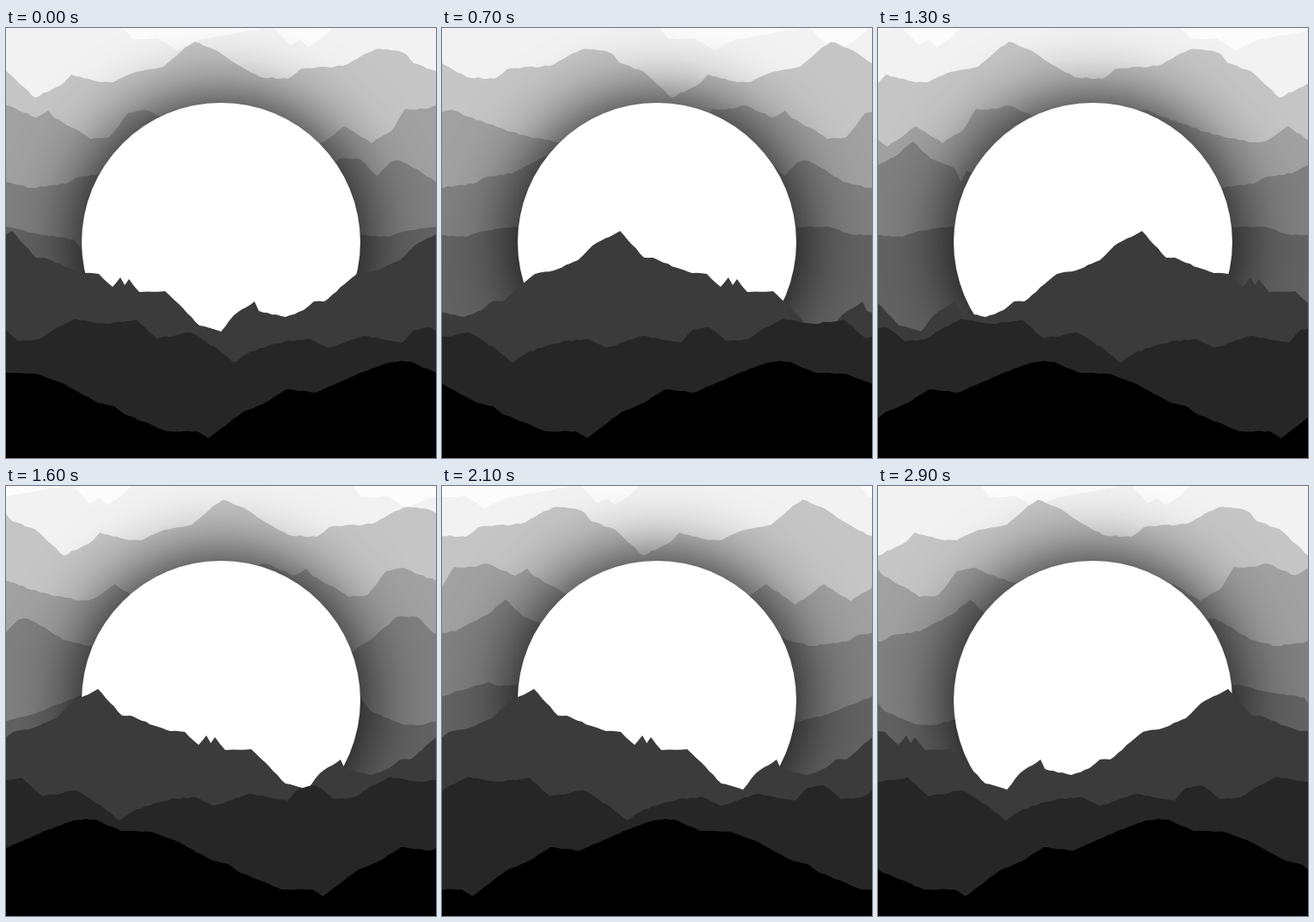
Animation of 500 by 500 pixels, one loop 3 s. Source, as an HTML page with a canvas:

```html
<!DOCTYPE html>
<html lang="en">
<head>
<meta charset="utf-8">
<title>Mountains</title>
<style>
  html, body { margin: 0; width: 100%; height: 100%; overflow: hidden; background: #fff; }
  canvas { display: block; }
</style>
</head>
<body>
<canvas id="stage" width="500" height="500"></canvas>
<script>
const SIZE = 500, LOOP = 3000, STEP = 100, LEAD = 16, GRAIN = 5;
const ctx = document.getElementById('stage').getContext('2d');

function seeded(seed) {
  return () => {
    seed = (seed * 16807) % 2147483647;
    return seed / 2147483647;
  };
}

// Joins a few key points and breaks long slopes into small seeded crags.
function outline(keys, rough, seed) {
  const random = seeded(seed * 7919);
  const closed = [...keys, [SIZE, keys[0][1]]];
  return closed.slice(0, -1).flatMap(([x, y], i) => {
    const [nextX, nextY] = closed[i + 1];
    const parts = Math.max(1, Math.round((nextX - x) / GRAIN));
    return Array.from({ length: parts }, (_, k) => {
      const crag = k ? (random() - 0.5) * rough : 0;
      return [x + (nextX - x) * k / parts, y + (nextY - y) * k / parts + crag];
    });
  });
}

// A ridge repeats every SIZE pixels and scrolls right `turns` times per loop.
const ridge = (color, turns, rough, keys) =>
  ({ color, turns, points: outline(keys, rough, turns) });

const behind = [
  ridge('#f2f2f2', 1, 1.5, [
    [0, -9], [134, -2], [147, 13], [177, 12], [200, 26], [227, 13], [299, 0], [312, 0],
    [330, 20], [342, 14], [352, 22], [367, 12], [382, -2]
  ]),
  ridge('#c5c5c5', 2, 2, [
    [0, 50], [16, 65], [34, 81], [67, 64], [76, 54], [106, 62], [125, 63], [151, 51],
    [183, 45], [208, 23], [219, 16], [240, 24], [265, 40], [295, 57], [328, 59], [342, 48],
    [392, 44], [429, 25], [452, 26], [466, 31], [474, 41]
  ]),
  ridge('#a1a1a1', 3, 2, [
    [0, 90], [10, 93], [35, 104], [49, 96], [57, 105], [80, 117], [98, 129], [120, 127],
    [142, 99], [162, 95], [180, 103], [240, 124], [285, 133], [302, 131], [327, 114], [361, 138],
    [394, 114], [425, 134], [449, 119], [464, 94], [487, 94]
  ]),
  ridge('#808080', 4, 2, [
    [0, 179], [30, 186], [70, 181], [85, 173], [115, 169], [152, 150], [174, 132], [195, 152],
    [222, 163], [230, 179], [236, 166], [242, 168], [257, 191], [268, 187], [287, 199], [298, 189],
    [326, 199], [363, 174], [388, 152], [411, 152], [432, 172], [447, 156], [458, 154], [483, 168]
  ]),
  ridge('#636363', 5, 1.5, [
    [0, 231], [35, 239], [79, 246], [91, 262], [127, 277], [147, 278], [200, 265], [265, 239],
    [305, 228], [312, 232], [365, 231], [393, 240], [445, 243], [465, 236]
  ])
];

const front = [
  ridge('#3b3b3b', 6, 1.5, [
    [0, 240], [7, 236], [35, 267], [45, 267], [58, 273], [91, 285], [108, 286], [124, 301],
    [133, 290], [138, 299], [143, 292], [155, 307], [185, 306], [201, 321], [225, 346], [250, 353],
    [265, 334], [289, 318], [294, 329], [325, 336], [346, 328], [358, 318], [370, 318], [398, 294],
    [408, 286], [430, 282], [458, 270], [475, 253]
  ]),
  ridge('#262626', 7, 2, [
    [0, 352], [14, 364], [38, 362], [60, 348], [80, 338], [116, 344], [151, 339], [176, 361],
    [214, 354], [247, 374], [265, 389], [285, 376], [325, 364], [354, 362], [374, 372], [416, 358],
    [461, 366], [475, 351], [493, 348]
  ]),
  ridge('#000', 8, 1, [
    [0, 401], [35, 402], [63, 412], [78, 420], [108, 436], [126, 440], [136, 448], [187, 469],
    [222, 469], [235, 477], [275, 447], [301, 436], [326, 420], [360, 424], [415, 400], [445, 389],
    [459, 387], [471, 388]
  ])
];

function drawRidge({ color, turns, points }, progress) {
  const shift = (progress * turns % 1) * SIZE;
  ctx.fillStyle = color;
  ctx.beginPath();
  ctx.moveTo(shift - SIZE, SIZE);
  for (const start of [shift - SIZE, shift]) {
    for (const [x, y] of points) ctx.lineTo(start + x, y);
  }
  ctx.lineTo(shift + SIZE, points[0][1]);
  ctx.lineTo(shift + SIZE, SIZE);
  ctx.fill();
}

function drawSun() {
  ctx.save();
  ctx.shadowColor = '#000';
  ctx.shadowBlur = 85;
  ctx.fillStyle = '#fff';
  ctx.beginPath();
  ctx.arc(250, 249, 162, 0, Math.PI * 2);
  ctx.fill();
  ctx.restore();
}

function draw() {
  // The scene moves in held steps; the small lead offsets display latency.
  const step = Math.floor((performance.now() + LEAD) / STEP);
  const progress = step * STEP % LOOP / LOOP;
  ctx.fillStyle = '#fcfcfc';
  ctx.fillRect(0, 0, SIZE, SIZE);
  behind.forEach(layer => drawRidge(layer, progress));
  drawSun();
  front.forEach(layer => drawRidge(layer, progress));
  requestAnimationFrame(draw);
}

draw();
</script>
</body>
</html>
```
